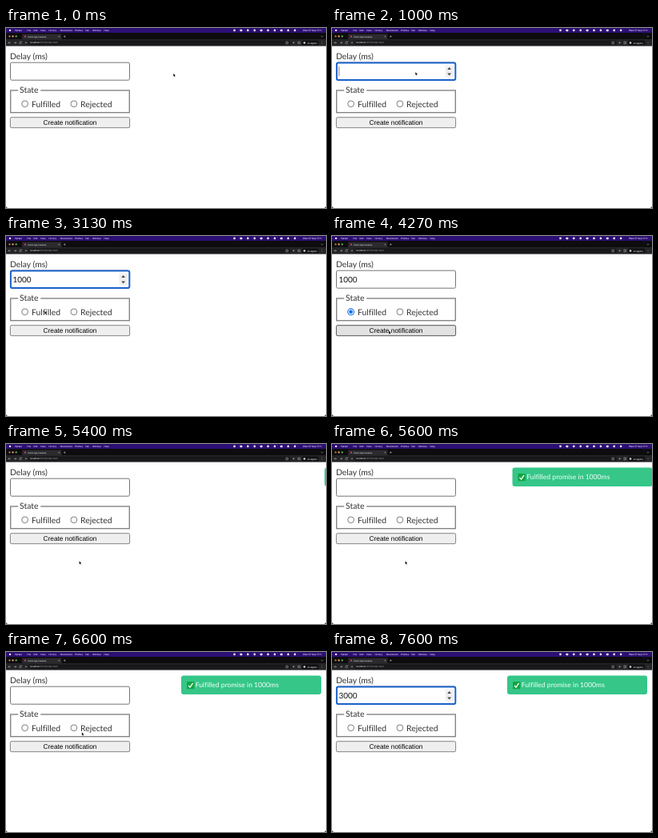
These frames come from a looping animation (400 px wide and 225 px high, 8000 ms). An HTML page:

```html
<!DOCTYPE html>
<html lang="en">
<head>
<meta charset="utf-8">
<title>Notification form</title>
<style>
html, body { margin: 0; width: 100%; height: 100%; overflow: hidden; background: #fff; }
svg { display: block; width: 100vw; height: 100vh; }
text { text-rendering: geometricPrecision; white-space: pre; }
.ui { font: 10.4px Lato, "Open Sans", sans-serif; font-variant-ligatures: none; fill: #333; }
.bar { font: 500 2.8px Inter, Roboto, sans-serif; fill: #e9e6f2; }
.btn { font: 8.3px "Liberation Sans", Arial, sans-serif; fill: #000; }
</style>
</head>
<body>
<svg viewBox="0 0 400 225" preserveAspectRatio="none">
  <rect width="400" height="225" fill="#fff"/>

  <g id="bars">
    <rect width="400" height="6" fill="#2c0f73"/>
    <rect y="6" width="400" height="8.5" fill="#0d0d10"/>
    <rect y="14" width="400" height="8.6" fill="#242427"/>
    <path d="M19 14.2q1.2-.2 1.2-1.4V8.6q0-1.2 1.2-1.2H68q1.2 0 1.2 1.2v4.2q0 1.2 1.2 1.4z" fill="#2b2b2e"/>
    <rect x="28" y="15.4" width="328" height="6" rx="3" fill="#18181a"/>
    <circle cx="5" cy="2.9" r="1.2" fill="#f0edf8"/>
    <circle cx="4.5" cy="10.4" r="1.1" fill="#ee6a5f"/>
    <circle cx="8.6" cy="10.4" r="1.1" fill="#f5bd4f"/>
    <circle cx="12.7" cy="10.4" r="1.1" fill="#61c454"/>
    <circle cx="24" cy="10.6" r="1.1" fill="#d8475c"/>
    <text class="bar" x="27" y="11.5" style="font-size:2.35px">Vanilla App Template</text>
    <g fill="none" stroke="#c9c9cd" stroke-width=".5">
      <path d="M65.5 9.8l1.6 1.6m0-1.6l-1.6 1.6M72 10.6h2.6m-1.3-1.3v2.6M393.8 10l1.2 1.2 1.2-1.2"/>
      <path d="M5.8 18.4H3m1.2-1.2L3 18.4l1.2 1.2M10 18.4h2.8m-1.2-1.2l1.2 1.2-1.2 1.2"/>
      <path d="M19.3 17.6a1.4 1.4 0 1 0 .2 1.4m0-2.2v1h-1"/>
      <path d="M350 17.2h2.4v2.6H350zM358.4 18.4h2.4m-1.2-1.2v2.4M365 17.2h2.6v2.4H365z"/>
    </g>
    <rect x="369.6" y="15.6" width="21.6" height="5.8" rx="2.9" fill="#111113"/>
    <circle cx="373" cy="18.5" r="1.3" fill="#d0d0d4"/>
    <text class="bar" x="376.8" y="19.5" style="font-size:2.7px">Incognito</text>
    <circle cx="25" cy="18.4" r=".8" fill="#aaa"/>
    <text class="bar" x="30" y="19.4" style="font-size:2.85px">localhost<tspan fill="#929298">:5173/index.html</tspan></text>
    <path d="M395 16.8v.5m0 .9v.5m0 .9v.5" stroke="#ccc" stroke-width=".6"/>
    <text class="bar" x="371" y="3.9" style="font-size:2.9px">Wed 27 Sep 17:11</text>
  </g>

  <text class="ui" x="5" y="38.7">Delay (ms)</text>
  <rect x="5.5" y="43.2" width="149" height="22" rx="1.8" fill="#fff" stroke="#767676"/>
  <rect id="ring" x="5.9" y="43.4" width="148.4" height="21.5" rx="2" fill="none" stroke="#1c61c9" stroke-width="2"/>
  <g id="spin">
    <rect x="141.5" y="46.8" width="10.6" height="14.8" fill="#f0f0f0"/>
    <path d="M144.2 52l2.4-3 2.4 3zM144.2 56.4l2.4 3 2.4-3z" fill="#484848"/>
  </g>
  <text id="value" class="ui" x="8.6" y="57.7" style="font-size:9.9px;fill:#111"></text>
  <rect id="caret" y="48.2" width=".6" height="12" fill="#333"/>

  <rect x="5.7" y="78" width="148.6" height="27.7" fill="none" stroke="#858585" stroke-width="1.4"/>
  <rect x="15.2" y="74" width="28" height="8" fill="#fff"/>
  <text class="ui" x="17" y="81.4">State</text>
  <circle id="radio" cx="23.6" cy="94.8" r="3.9" fill="#fff"/>
  <circle id="dot" cx="23.6" cy="94.8" r="2.4" fill="#1a73e8"/>
  <text class="ui" x="32" y="98.7">Fulfilled</text>
  <circle cx="84.9" cy="94.8" r="3.9" fill="#fff" stroke="#6e6e6e" stroke-width=".9"/>
  <text class="ui" x="93" y="98.7">Rejected</text>

  <rect id="button" x="5.4" y="111.7" width="149.2" height="13" rx="1.6" stroke-width=".9"/>
  <text class="btn" x="80" y="121.2" text-anchor="middle">Create notification</text>

  <g id="toast">
    <rect x="219" y="29.4" width="175" height="23.6" rx="3" fill="#35c688"/>
    <rect x="226" y="37" width="9.4" height="9.2" rx="1.3" fill="#12a541"/>
    <path d="M228 41.9l2 2.2 3.6-5.2" fill="none" stroke="#fff" stroke-width="1.3"/>
    <text class="ui" x="236.8" y="44.4" style="font-size:8.6px;fill:#f4fffa">Fulfilled promise in 1000ms</text>
  </g>

  <path id="pointer" d="M0 0v3.5l.8-.7.6 1.3.7-.3-.6-1.3h1.1z" fill="#000" stroke="#fff" stroke-width=".35" paint-order="stroke"/>
  <path d="M0 222.6V225h2.4Q0 225 0 222.6zM400 222.6V225h-2.4q2.4 0 2.4-2.4z" fill="#222"/>
</svg>
<script>
const LOOP = 8000;
const $ = id => document.getElementById(id);
const svgNS = "http://www.w3.org/2000/svg";

function add(tag, attrs, text = "") {
  const el = document.createElementNS(svgNS, tag);
  for (const key in attrs) el.setAttribute(key, attrs[key]);
  el.textContent = text;
  $("bars").append(el);
}

const menu = [["Tarvel", 11], ["File", 26.5], ["Edit", 34.5], ["View", 43], ["History", 53.5],
  ["Bookmarks", 68], ["Profiles", 86], ["Tab", 99], ["Window", 108], ["Help", 122.5]];
menu.forEach(([label, x], i) =>
  add("text", { class: "bar", x, y: 3.9, style: `font-weight:${i ? 500 : 700}` }, label));
for (let i = 0; i < 10; i++) {
  const x = 285.5 + i * 8.4;
  if (i % 3 === 1) add("rect", { x: x - 1.4, y: 1.7, width: 2.8, height: 2.5, rx: .6, fill: "#eeeaf8" });
  else add("circle", { cx: x, cy: 2.9, r: 1.3, fill: "#eeeaf8" });
}

// time, x, y
const path = [[0, 209.3, 57], [70, 209.3, 57], [800, 104.3, 55.2], [1730, 104.3, 55.2],
  [2670, 98, 55.5], [3080, 48.5, 94], [3670, 48.5, 94], [4200, 71, 118.6], [4480, 71, 118.6],
  [4670, 91.6, 146.6], [6270, 91.6, 146.6], [6930, 98, 55], [LOOP, 98, 55]];
const typed = [[0, ""], [1930, "1"], [2200, "10"], [2330, "100"], [2530, "1000"], [4450, ""],
  [7200, "3"], [7330, "30"], [7470, "300"], [7600, "3000"]];
const focusAt = [[800, 3400], [7000, LOOP]];
const hiddenAt = [[1930, 2670], [7200, LOOP]];

const within = (spans, t) => spans.find(([a, b]) => t >= a && t < b);
const ease = p => p * p * (3 - 2 * p);
const show = (id, on) => $(id).setAttribute("visibility", on ? "visible" : "hidden");
const paint = (id, fill, stroke) => {
  $(id).setAttribute("fill", fill);
  $(id).setAttribute("stroke", stroke);
};

function pointerAt(t) {
  const i = path.findIndex(p => p[0] > t);
  const [t0, x0, y0] = path[i - 1], [t1, x1, y1] = path[i];
  const p = ease((t - t0) / (t1 - t0));
  return [x0 + (x1 - x0) * p, y0 + (y1 - y0) * p];
}

function render(t) {
  const [x, y] = pointerAt(t);
  $("pointer").setAttribute("transform", `translate(${x} ${y})`);
  show("pointer", !within(hiddenAt, t));

  const focus = within(focusAt, t);
  const overField = x < 155 && y > 43 && y < 65;
  show("ring", focus);
  show("spin", focus || overField);

  const [typedAt, value] = typed.filter(k => k[0] <= t).pop();
  if ($("value").textContent !== value) $("value").textContent = value;
  const since = focus ? t - Math.max(typedAt, focus[0]) : 0;
  show("caret", focus && value !== "3000" && since % 1000 < 500);
  $("caret").setAttribute("x", 8.6 + (value ? $("value").getComputedTextLength() + .3 : 0));

  const checked = t >= 3400 && t < 4450;
  show("dot", checked);
  paint("radio", "#fff", checked ? "#1a73e8" : "#6e6e6e");
  $("radio").setAttribute("stroke-width", checked ? 1.1 : .9);

  const over = x < 155 && y > 111.5 && y < 125;
  const pressed = t >= 4380 && t < 4450;
  paint("button", pressed ? "#f5f5f5" : over ? "#e2e2e2" : "#efefef", over ? "#444" : "#767676");

  const slide = Math.min(1, Math.max(0, (t - 5400) / 300));
  show("toast", slide > 0);
  $("toast").setAttribute("transform", `translate(${181 * (1 - slide) ** 3} 0)`);
}

function tick(now) {
  render(now % LOOP);
  requestAnimationFrame(tick);
}
render(0);
requestAnimationFrame(tick);
</script>
</body>
</html>
```
